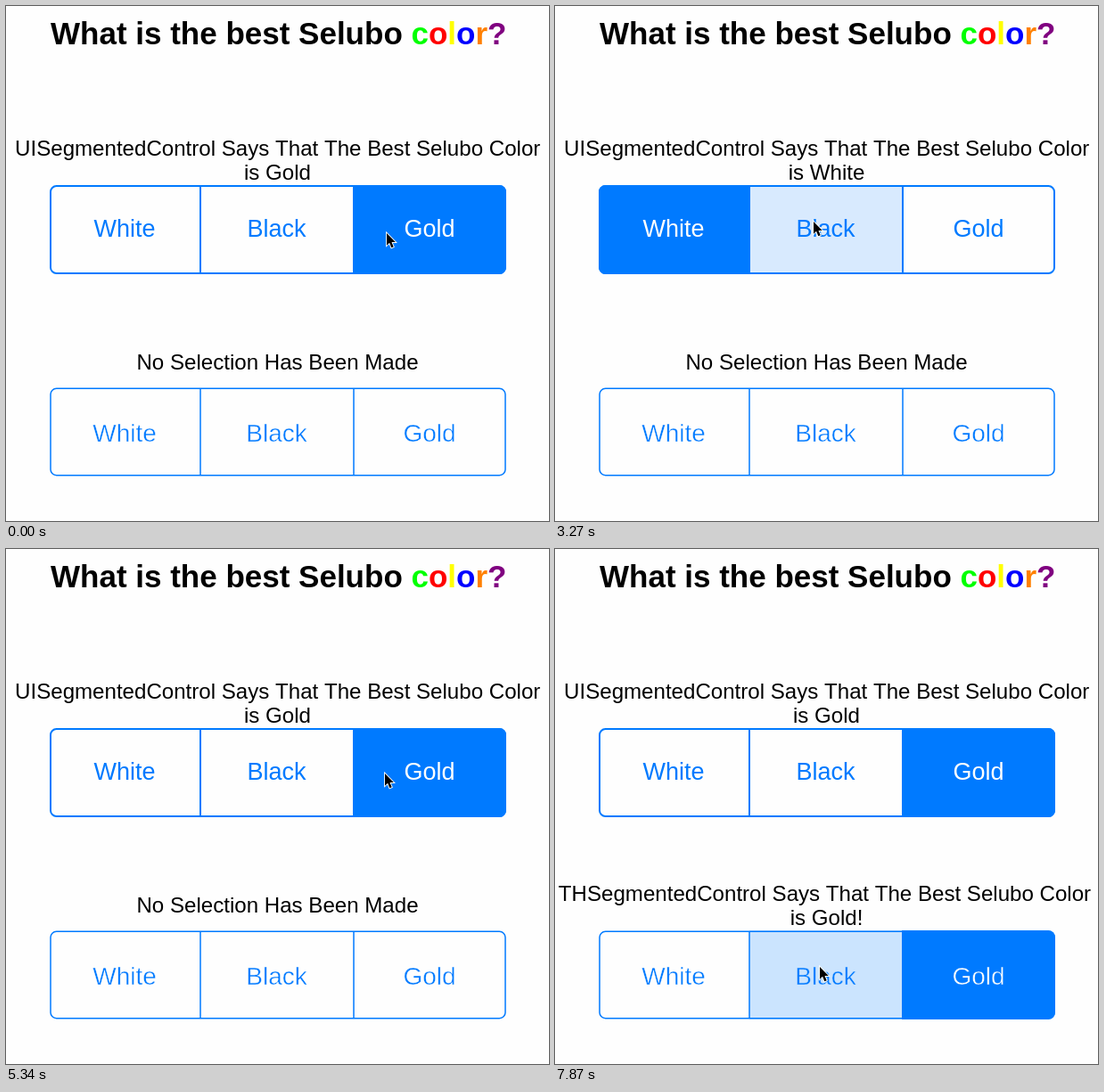
Recreate the animation shown at these times as an HTML page with a canvas. Size 609 px wide and 578 px high, loop 8 s.

```html
<!DOCTYPE html>
<html lang="en">
<head>
<meta charset="utf-8">
<title>Segmented controls</title>
<style>
  html, body { margin: 0; width: 100%; height: 100%; overflow: hidden; background: #fefefe; }
  canvas { display: block; }
</style>
</head>
<body>
<canvas id="stage" width="609" height="578"></canvas>
<script>
const LOOP = 8000, STEP = 148.5;   // ms; the picture advances in steps
const SPEED = 55;                  // pointer pixels per step
const MIX = 0.9;                   // cross-fade on the step of a pick
const BLUE = [0, 122, 255], WHITE = [254, 254, 254];
const FONT = '"Liberation Sans", Arial, sans-serif';
const NAMES = ['White', 'Black', 'Gold'];
const EDGES = [49, 218, 390, 561];
const PRODUCT = 'Selubo';
const LABEL = 24.1;

const ROWS = [
  { top: 201, size: 27, base: 258.5, first: 2, tint: 0.15, line: 2 },
  { top: 428, size: 28, base: 489, first: -1, tint: 0.2, line: 1.5, trim: 0.5 }
];

// Each tap: the pointer sets off at `go`, presses, then picks on release (in steps).
const HOME = { x: 427, y: 255 };
const TAPS = [
  { row: 0, seg: 1, x: 340, y: 252, go: 1, press: 3, pick: 7 },
  { row: 0, seg: 0, x: 167, y: 242, go: 10, press: 13, pick: 17 },
  { row: 0, seg: 1, x: 290, y: 242, go: 19, press: 22, pick: 27 },
  { row: 0, seg: 2, x: 425, y: 252, go: 29, press: 32, pick: 35 },
  { row: 1, seg: 2, x: 430, y: 472, go: 40, press: 45, pick: 49 },
  { row: 1, seg: 1, x: 297, y: 469, go: 51, press: 53, pick: Infinity }
];

const ctx = document.getElementById('stage').getContext('2d');

const lerp = (a, b, k) => a + (b - a) * k;
const blend = (a, b, k) => `rgb(${a.map((v, i) => Math.round(lerp(v, b[i], k)))})`;
const smooth = k => k * k * (3 - 2 * k);

function text(str, x, y, size, color = '#000', align = 'center', weight = '') {
  ctx.font = `${weight} ${size}px ${FONT}`;
  ctx.textAlign = align;
  ctx.fillStyle = color;
  ctx.fillText(str, x, y);
  return ctx.measureText(str).width;
}

function rowState(row, index, step) {
  const state = { picked: row.first, fill: [0, 0, 0], ink: [0, 0, 0] };
  const set = (seg, v) => { state.fill[seg] = state.ink[seg] = v; };
  if (row.first >= 0) set(row.first, 1);
  for (const tap of TAPS) {
    if (tap.row !== index || step < tap.press) continue;
    if (step < tap.pick) {
      state.fill[tap.seg] = row.tint;
      continue;
    }
    const k = step > tap.pick ? 1 : MIX;
    if (state.picked >= 0) set(state.picked, 1 - k);
    set(tap.seg, k);
    state.picked = tap.seg;
  }
  return state;
}

function pointerAt(step) {
  let { x, y } = HOME;
  for (const tap of TAPS) {
    if (step < tap.go) break;
    const steps = Math.round(Math.hypot(tap.x - x, tap.y - y) / SPEED);
    const k = smooth(Math.min(1, (step - tap.go + 1) / steps));
    x = lerp(x, tap.x, k);
    y = lerp(y, tap.y, k);
  }
  return { x, y };
}

function drawTitle() {
  const rainbow = ['#0f0', '#f00', '#ff0', '#00f', '#ff8000', '#800080'];
  let x = 50;
  const add = (str, color) => { x += text(str, x, 43, 35, color, 'left', 'bold'); };
  add(`What is the best ${PRODUCT} `, '#000');
  [...'color?'].forEach((char, i) => add(char, rainbow[i]));
}

function drawControl({ top, size, base, line, trim }, { fill, ink }) {
  ctx.save();
  ctx.beginPath();
  ctx.roundRect(49, top, 512, 100, 7.6);
  ctx.clip();
  fill.forEach((v, i) => {
    // A fully selected segment also covers its dividers.
    const grow = v === 1 ? 1 : 0;
    ctx.fillStyle = blend(WHITE, BLUE, v);
    ctx.fillRect(EDGES[i] - grow, top, EDGES[i + 1] - EDGES[i] + 2 * grow, 100);
  });
  ctx.restore();

  const inset = 2 - line / 2;
  ctx.strokeStyle = blend(BLUE, BLUE, 0);
  ctx.lineWidth = line;
  ctx.beginPath();
  ctx.roundRect(50, top + inset, 510, 100 - 2 * inset, 6.6);
  for (const x of EDGES.slice(1, 3)) {
    ctx.moveTo(x, top + 1);
    ctx.lineTo(x, top + 99);
  }
  ctx.stroke();

  NAMES.forEach((name, i) => {
    const mid = (EDGES[i] + EDGES[i + 1]) / 2 - 0.5;
    text(name, mid, base, size, blend(BLUE, WHITE, ink[i]));
    if (!trim) return;
    // Trim the glyph edges for a light weight.
    ctx.strokeStyle = blend(WHITE, BLUE, fill[i]);
    ctx.lineWidth = trim;
    ctx.lineJoin = 'round';
    ctx.strokeText(name, mid, base);
  });
}

function drawLabels(upper, lower) {
  const says = (prefix, x, y, end) => {
    text(`${prefix}SegmentedControl Says That The Best ${PRODUCT} Color`, x, y, LABEL);
    text(end, 304.5, y + 27, LABEL);
  };
  says('UI', 304.7, 167.5, `is ${NAMES[upper]}`);
  if (lower < 0) text('No Selection Has Been Made', 304.5, 407.5, LABEL);
  else says('TH', 302.5, 394.5, `is ${NAMES[lower]}!`);
}

function drawPointer({ x, y }) {
  const shape = [[0, 0], [0, 13.7], [3.1, 10.8], [5.3, 16.2], [7.7, 15.2], [5.5, 10], [9.8, 10]];
  ctx.beginPath();
  for (const [dx, dy] of shape) ctx.lineTo(x + dx, y + dy);
  ctx.closePath();
  ctx.lineJoin = 'miter';
  ctx.lineWidth = 1.8;
  ctx.strokeStyle = '#fff';
  ctx.stroke();
  ctx.fillStyle = '#000';
  ctx.fill();
}

function draw(t) {
  const step = Math.floor((t + 8) / STEP);
  ctx.fillStyle = blend(WHITE, WHITE, 0);
  ctx.fillRect(0, 0, 609, 578);
  const states = ROWS.map((row, i) => rowState(row, i, step));
  drawTitle();
  drawLabels(...states.map(s => s.picked));
  ROWS.forEach((row, i) => drawControl(row, states[i]));
  drawPointer(pointerAt(step));
}

const start = performance.now();
function tick() {
  draw((performance.now() - start) % LOOP);
  requestAnimationFrame(tick);
}
tick();
</script>
</body>
</html>
```
